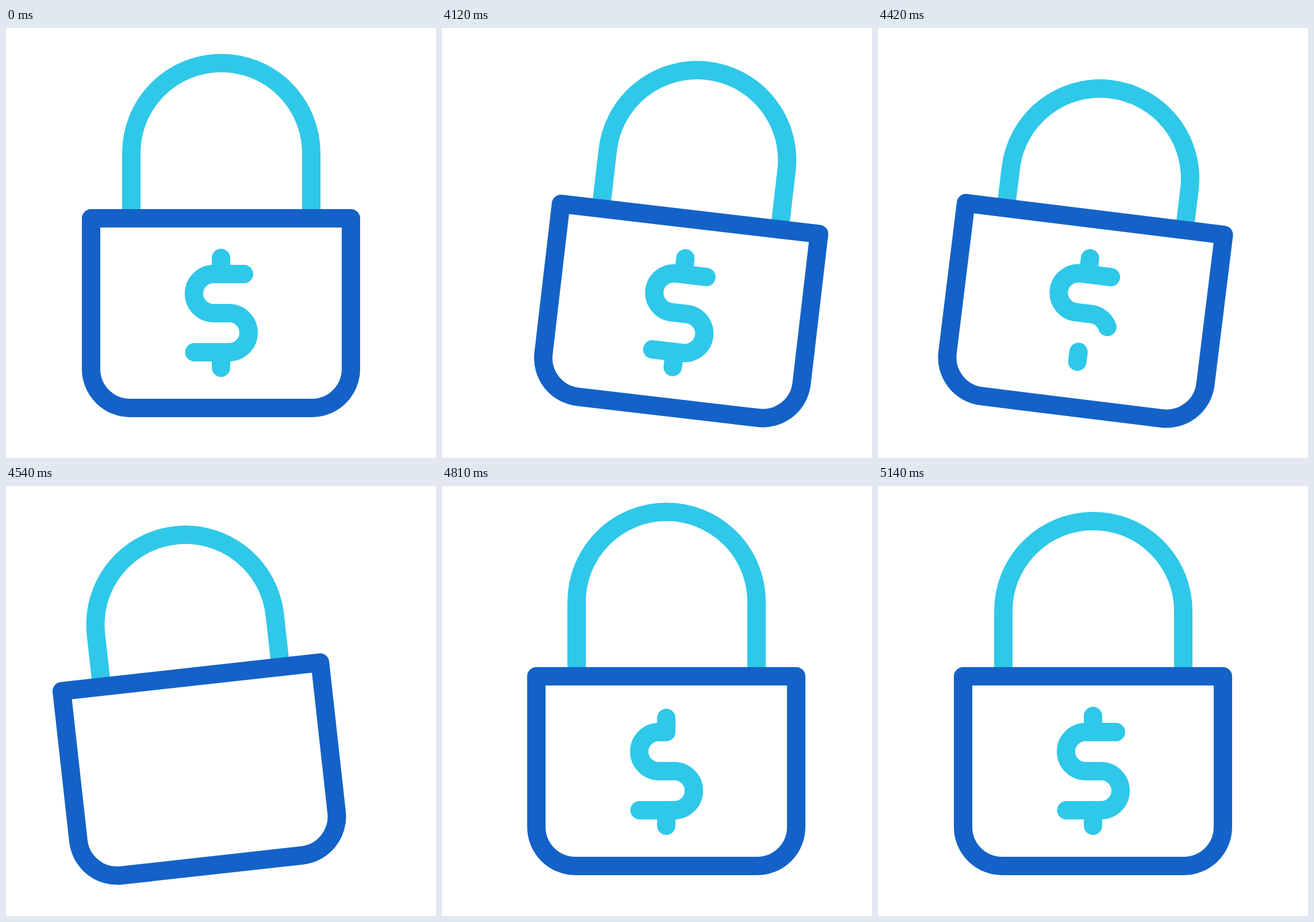
Write an HTML page that moves like this. It is 748 by 748 pixels and loops after 5.17 s.

```html
<!DOCTYPE html>
<html lang="en">
<head>
<meta charset="utf-8">
<title>Padlock</title>
<style>
  html, body { margin: 0; width: 100%; height: 100%; overflow: hidden; background: #fff; }
  svg { display: block; width: 100%; height: 100%; }
  path { fill: none; stroke-width: 32; stroke-linejoin: round; }
  .cyan { stroke: #2fc8e9; }
  .blue { stroke: #1462c7; }
  #sign path { stroke-linecap: round; }
</style>
</head>
<body>
<svg viewBox="0 0 748 748">
  <g id="lock">
    <path id="shackle" class="cyan"/>
    <path class="blue" d="M148 331H600V593a68 68 0 0 1-68 68H216a68 68 0 0 1-68-68Z"/>
    <g id="sign" class="cyan">
      <path pathLength="1" d="M374 400V428"/>
      <path pathLength="1" d="M414 428H361a34 34 0 0 0 0 68H388a34 34 0 0 1 0 68H327.5"/>
      <path pathLength="1" d="M374 564V591"/>
    </g>
  </g>
</svg>
<script>
const LOOP = 5170, START = 4030, STEP = 30;
const TURN = 4540, HALF = 530; // the sign is gone at TURN

// Swing between [ms, value] extremes with sine ease-in-out.
const swing = (...keys) => t => {
  const i = keys.findIndex(k => k[0] > t);
  if (i < 1) return 0;
  const [t0, a] = keys[i - 1], [t1, b] = keys[i];
  return a + (b - a) * (1 - Math.cos(Math.PI * (t - t0) / (t1 - t0))) / 2;
};

const tilt = swing([4000, 0], [4268, 15.9], [4690, -15], [4870, 5], [5140, 0]);
const slide = swing([3978, 0], [4188, 50.3], [4522, -35], [4760, 17], [5110, 0]);
const sink = swing([4020, 0], [4340, 47], [4805, -16], [5080, 0]);

// Hidden share of the sign: circular ease up to TURN, mirrored after it.
const hidden = t => {
  const x = Math.max(0, 1 - Math.abs(t - TURN) / HALF);
  return 1 - Math.sqrt(1 - x * x);
};

const lock = document.getElementById('lock');
const shackle = document.getElementById('shackle');
const sign = document.getElementById('sign');

// Show only the part of each sign stroke between two fractions of its length.
function trim(from, to) {
  const len = to - from;
  sign.style.display = len > 0.002 ? '' : 'none';
  for (const p of sign.children) {
    p.setAttribute('stroke-dasharray', `${to === 1 ? len + 0.01 : len} 3`);
    p.setAttribute('stroke-dashoffset', -from);
  }
}

function draw(ms) {
  const t = ms < START ? 0 : START + STEP * Math.floor((ms - START) / STEP);
  lock.setAttribute('transform', `translate(${slide(t)} 0) rotate(${tilt(t)} 374 495.5)`);
  shackle.setAttribute('d', `M218 331V${217.5 + sink(t)}a156.5 156.5 0 0 1 313 0V331`);
  if (t < TURN) trim(0, 1 - hidden(t));
  else trim(hidden(t), 1);
}

const begin = performance.now();
function tick() {
  draw((performance.now() - begin) % LOOP);
  requestAnimationFrame(tick);
}
tick();
</script>
</body>
</html>
```
